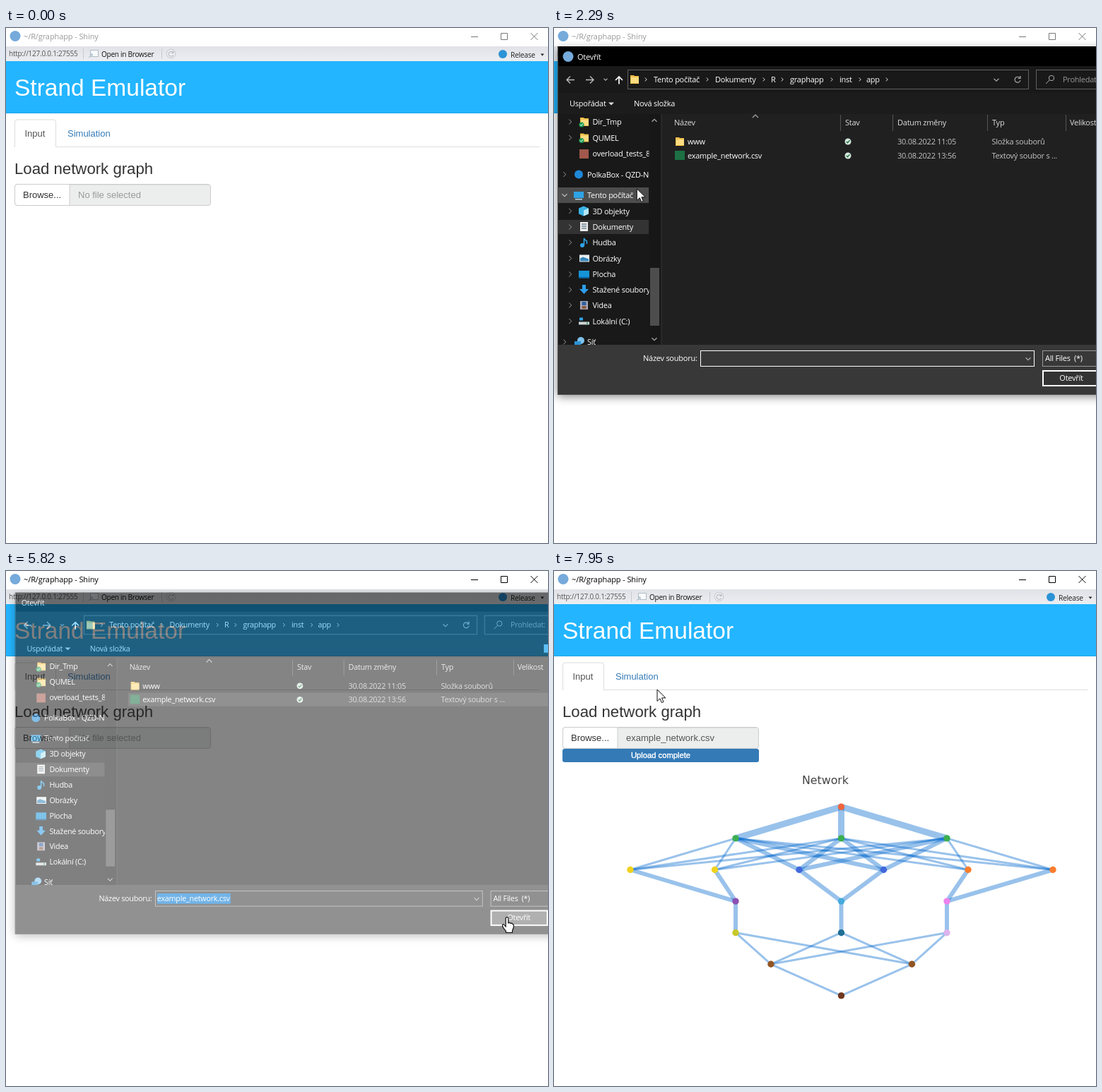
An HTML page for the animation above (8000 ms loop, 767 px wide and 730 px high).

```html
<!DOCTYPE html>
<html lang="en">
<head>
<meta charset="utf-8">
<title>Strand Emulator</title>
<style>
html,body{margin:0;width:100%;height:100%;overflow:hidden;background:#fff}
svg{display:block;width:767px;height:730px}
text{white-space:pre}
.ui{font:11px "Open Sans","Noto Sans",sans-serif;letter-spacing:-.25px}
.page{font:13px "Liberation Sans",Arial,sans-serif}
</style>
</head>
<body>
<svg id="stage" viewBox="0 0 767 730" xmlns="http://www.w3.org/2000/svg"></svg>
<script>
const LOOP = 8000;
const stage = document.getElementById('stage');

const rect = (x, y, w, h, fill, more = '') =>
  `<rect x="${x}" y="${y}" width="${w}" height="${h}" fill="${fill}" ${more}/>`;
const disc = (x, y, r, fill, more = '') =>
  `<circle cx="${x}" cy="${y}" r="${r}" fill="${fill}" ${more}/>`;
const line = (d, color, w = 1, more = '') =>
  `<path d="${d}" fill="none" stroke="${color}" stroke-width="${w}" ${more}/>`;
const shape = (d, fill, more = '') => `<path d="${d}" fill="${fill}" ${more}/>`;
const ui = (x, y, s, fill = '#fff', more = '') =>
  `<text class="ui" x="${x}" y="${y}" fill="${fill}" ${more}>${s}</text>`;
const page = (x, y, s, fill, size = 13, more = '') =>
  `<text class="page" x="${x}" y="${y}" fill="${fill}" style="font-size:${size}px" ${more}>${s}</text>`;
const group = (id, body, more = '') => `<g id="${id}" ${more}>${body}</g>`;

const right = (x, y, c = '#ddd', s = 2.5) => line(`M${x - s / 2} ${y - s}l${s} ${s}l${-s} ${s}`, c);
const down = (x, y, c = '#aaa', s = 3.5) => line(`M${x - s} ${y - s / 2}l${s} ${s}l${s} ${-s}`, c, 1.2);
const up = (x, y, c = '#aaa', s = 3.5) => line(`M${x - s} ${y + s / 2}l${s} ${-s}l${s} ${s}`, c, 1.2);
const folder = (x, y) => shape(`M${x} ${y - 6}h5l1 1h6v11h-12z`, '#f3c04b') +
  rect(x + 1, y - 3, 11, 8, '#ffdc80');

/* ---- application window ---- */
function windowBar() {
  return rect(0, 0, 767, 26, '#fff') + disc(13, 11.5, 7.5, '#75aadb') +
    ui(25, 16, '~/R/graphapp - Shiny', '#999', 'id="caption" style="letter-spacing:-.1px"') +
    group('controls', line('M658 12.5h10M700.5 7.5h9v9h-9zM742.5 7l10 10m0-10l-10 10', 'currentColor')) +
    rect(0, 26, 767, 21, 'url(#bar)') +
    ui(4, 40, 'http://127.0.0.1:27555', '#555', 'style="font-size:10px"') +
    line('M109.5 29v15M220.5 29v15', '#c8cacf') +
    rect(119.5, 31.5, 11, 9, '#f7f9fb', 'stroke="#b3bdc6"') +
    line('M117 42l5-5m-3 0h3v3', '#9fb3c0') +
    ui(135, 41, 'Open in Browser', '#111', 'style="font-size:10px"') +
    disc(233.5, 36.5, 6.3, '#eceef1', 'stroke="#c3c6cc"') +
    line('M236.5 35a3.4 3.4 0 1 0 .2 3.2M237 32.5v3h-3', '#b9bcc4', 1.2) +
    disc(703, 37, 6, '#2b93d6') +
    ui(714, 41.5, 'Release', '#222', 'style="font-size:10.2px"') +
    shape('M756.5 36.5h5l-2.5 3z', '#222');
}

function pageBody() {
  return rect(0, 47, 767, 74, '#23b5ff') + rect(0, 120, 767, 1, '#20a6ea') +
    page(12, 96, 'Strand Emulator', '#fff', 33.5) +
    line('M70.5 168.5H755M12 168.5h1', '#ddd') +
    line('M12.5 168.5V133.5q0-3.5 3.5-3.5H67q3.5 0 3.5 3.5V168.5', '#ddd') +
    page(26.5, 154, 'Input', '#555') + page(87, 154, 'Simulation', '#337ab7') +
    page(12, 207, 'Load network graph', '#333', 22.2) +
    rect(12.5, 221.5, 277, 30, '#eceeed', 'rx="3.5" stroke="#ccc"') +
    line('M91 222.5h197', '#dcdedd') +
    shape('M90 221.5H16q-3.5 0-3.5 3.5v23q0 3.5 3.5 3.5h74z', '#fff', 'id="browse" stroke="#ccc"') +
    page(24, 241, 'Browse...', '#333') +
    page(102, 241, 'No file selected', '#999', 13, 'id="fileName"') +
    group('upload', rect(12, 252, 278, 19, '#337ab7', 'rx="3" id="uploadBar"') +
      page(151, 265, 'Upload complete', '#fff', 11.2, 'text-anchor="middle" stroke="#fff" stroke-width=".4"'));
}

/* ---- network plot ---- */
const LAYERS = [
  ['406.5', '#f0643c'], ['257 406.5 556', '#3caf50 #3caf50 #3caf50'],
  ['108 227.5 347 466.5 586 706', '#f0d21e #f0d21e #4169dc #4169dc #fa7d2d #fa7d2d'],
  ['257 406.5 556', '#8c50b4 #46aadc #ee82ee'], ['257 406.5 556', '#c8c828 #1e6e96 #ddb4ee'],
  ['307 506.5', '#915523 #915523'], ['406.5', '#6e371e']
];
const layers = LAYERS.map(([xs, colors], i) => {
  const tint = colors.split(' ');
  return xs.split(' ').map((x, k) => ({x: +x, y: 334.3 + i * 44.6, c: tint[k]}));
});

function network() {
  const edge = (a, b, w) => line(`M${a.x} ${a.y}L${b.x} ${b.y}`, '#06c', w, 'opacity=".4"');
  const [top, hubs, mids, joins, ends, lows, last] = layers;
  let s = hubs.map(n => edge(top[0], n, 9)).join('');
  for (const h of hubs) mids.forEach((m, i) => s += edge(h, m, i === 2 || i === 3 ? 6 : 3));
  mids.forEach((m, i) => s += edge(m, joins[i >> 1], 6));
  joins.forEach((j, i) => s += edge(j, ends[i], 6));
  for (const e of ends) for (const l of lows) s += edge(e, l, 3);
  for (const l of lows) s += edge(l, last[0], 3);
  for (const n of layers.flat()) s += disc(n.x, n.y, 4.7, n.c);
  const tools = rect(617, 296, 12, 9, '#c7c7c7', 'rx="1"') + disc(623, 300.5, 2.5, '#fff') +
    rect(647, 295, 12, 11, '#c7c7c7') + line('M650 300.5h6m-3-3v6', '#fff', 1.5) +
    rect(669, 295, 12, 11, '#c7c7c7') + line('M672 300.5h6', '#fff', 1.5) +
    line('M693 296l10 9m0-9l-10 9', '#c7c7c7', 2) + rect(720, 293, 15, 15, '#8a93a6', 'rx="1"');
  return `<text x="384" y="301.5" text-anchor="middle" fill="#444" style="font:15.8px 'DejaVu Sans',sans-serif">Network</text>` +
    s + group('tools', tools);
}

/* ---- file dialog ---- */
const TREE = [
  ['Dir_Tmp', 133], ['QUMEL', 155.5], ['overload_tests_8', 178], ['PolkaBox - QZD-NO', 207.5],
  ['Tento počítač', 237], ['3D objekty', 259.5], ['Dokumenty', 282], ['Hudba', 304],
  ['Obrázky', 326.5], ['Plocha', 349], ['Stažené soubory', 371], ['Videa', 393],
  ['Lokální (C:)', 415.5], ['Síť', 445]
];
const isRoot = i => i === 3 || i === 4 || i === 13;

function treeIcon(i, y) {
  const screen = (x, w) => rect(x, y - 5, w, 9, '#2ea3e6');
  switch (i) {
    case 0: case 1: return folder(37, y) + disc(39, y + 4, 3.6, '#1f9d55') + line(`M37 ${y + 4}l1.5 1.5 2.5-3`, '#fff');
    case 2: return rect(36, y - 6, 13, 13, '#a2584c');
    case 3: return disc(35, y, 6, '#1f88d8');
    case 4: return screen(28, 14) + rect(30, y + 5, 10, 1.5, '#b9d7ea');
    case 5: return shape(`M42 ${y - 7}l7 3v8l-7 3-7-3v-8z`, '#39b2e5') + shape(`M42 ${y - 1}l7-3v8l-7 3z`, '#b5e6f7');
    case 6: return rect(37, y - 7, 11, 13, '#eee') + line(`M39 ${y - 4}h7m-7 3h7m-7 3h7`, '#68808f', 1.3);
    case 7: return disc(40, y + 4, 3, '#2ea3e6') + line(`M42.5 ${y + 4}v-10q1 3 4 4v4`, '#2ea3e6', 1.6);
    case 8: return rect(36, y - 5, 14, 10, '#e8eef2') + shape(`M37 ${y + 4}v-4l4-2 8 3v3z`, '#3888bd');
    case 9: return rect(35, y - 5, 15, 11, '#1593d8') + rect(35, y + 4, 15, 2, '#0a5f9a');
    case 10: return shape(`M40 ${y - 7}h5v6h4l-6.5 7-6.5-7h4z`, '#2d9eea');
    case 11: return rect(37, y - 6, 11, 12, '#aab') + rect(39.5, y - 5, 6, 5, '#315f9c') + rect(39.5, y + 1, 6, 4, '#8a5b3e');
    case 12: return rect(35, y + 1, 15, 4, '#cfd6da') + rect(36, y - 5, 5, 4, '#2ea3e6') + rect(46, y + 2, 2, 2, '#2a9d5b');
    default: return disc(38, y - 2, 5, '#7ec3ec') + rect(29, y - 1, 9, 6, '#2b93d6');
  }
}

function tree() {
  let s = rect(6, 272, 128, 20, '#333') + rect(6, 226, 128, 22, '#4d4d4d', 'id="treeHover"');
  let chevrons = '';
  TREE.forEach(([name, y], i) => {
    s += treeIcon(i, y) + ui(isRoot(i) ? 47 : 54.5, y + 4, name);
    if (i === 4) chevrons += down(15, y, '#bbb');
    else if (i !== 2) chevrons += right(isRoot(i) ? 15 : 23, y, '#999', 3.5);
  });
  return `<g clip-path="url(#treeClip)">${s}${group('chevrons', chevrons)}</g>`;
}

function files() {
  const sync = y => disc(416, y, 4.5, '#d5e8dc') + line(`M413.8 ${y}l1.7 1.8 3-3.6`, '#17633a', 1.3);
  let s = line('M405.5 123v23M479.5 123v23M613.5 123v23M724.5 123v23', '#555') + up(285, 125, '#aaa', 4);
  [[170, 'Název'], [412, 'Stav'], [486, 'Datum změny'], [620, 'Typ'], [730, 'Velikost']]
    .forEach(([x, label]) => s += ui(x, 138, label, '#dedede'));
  s += rect(168, 171, 640, 19.5, '#4d4d4d', 'id="fileRow"') + folder(172, 161) + rect(171, 174, 14, 13, '#1d7044');
  [['www', '30.08.2022 11:05', 'Složka souborů', 161], ['example_network.csv', '30.08.2022 13:56', 'Textový soubor s ...', 181]]
    .forEach(([name, date, type, y]) =>
      s += ui(189, y + 4, name) + sync(y) + ui(486, y + 4, date, '#c4c4c4') + ui(619.5, y + 4, type, '#c4c4c4'));
  return s;
}

function addressBar() {
  let s = line('M29 73.5H18m5-5l-5 5 5 5M45 73.5h11m-5-5l5 5-5 5', '#bbb', 1.4) + down(73, 73, '#aaa', 2.5) +
    line('M92 79.5V69m-5 5l5-5 5 5', '#fff', 1.7) +
    rect(104.5, 59.5, 567, 27, '#191919', 'stroke="#606060"') + folder(108, 73) +
    rect(682.5, 59.5, 200, 27, '#191919', 'stroke="#606060"');
  [[141, 'Tento počítač'], [228, 'Dokumenty'], [307, 'R'], [334, 'graphapp'], [404, 'inst'], [442, 'app']]
    .forEach(([x, label]) => s += ui(x, 77, label));
  [130, 217, 297, 323, 393, 433, 471].forEach(x => s += right(x, 73));
  return s + down(626, 73.5) + line('M659 70.5a4 4 0 1 0 1 3.5M660 68v3.5h-3.5', '#aaa', 1.2) +
    disc(704, 71, 3.7, 'none', 'stroke="#aaa"') + line('M701 74l-5 5', '#aaa') + ui(720, 77, 'Prohledat:', '#999') +
    ui(22, 111, 'Uspořádat') + shape('M77 105.5h8l-4 4z', '#ddd') + ui(113, 111, 'Nová složka') +
    rect(768, 101, 12, 12, '#8cc8f0');
}

function dialog() {
  const W = 812;
  const skeleton = rect(5, 54, W, 395, '#fff') + rect(5, 122, 147, 327, '#191919') +
    rect(136, 340, 13, 82, '#4d4d4d') + up(142, 131) + down(142, 441) +
    rect(126, 461, 77, 15, '#fff') + rect(207, 457, 473, 23, '#fff') +
    rect(691, 457, 110, 23, '#fff') + rect(691, 485, 83, 24, '#fff');
  const content = rect(5, 54, W, 68, '#191919') + rect(5, 92, W, 30, '#1c1c1c') +
    rect(5, 122, 147, 327, '#191919') + rect(152, 122, 665, 327, '#202020') + rect(151.5, 122, 1, 327, '#343434') +
    addressBar() + tree() + rect(135, 122, 15, 327, '#171717') + rect(136, 340, 13, 82, '#4d4d4d') +
    up(142, 131) + down(142, 441) + files() + rect(5, 449, W, 71, '#383838') +
    ui(126, 472, 'Název souboru:') +
    rect(207.5, 457.5, 472, 22, '#383838', 'id="field" stroke="#fff"') +
    rect(210, 461, 106, 15, '#0078d7', 'id="marked"') + ui(210, 472.5, 'example_network.csv', '#fff', 'id="chosen"') +
    rect(210, 462, 1, 14, '#fff', 'id="caret"') + down(671, 469) +
    rect(691.5, 457.5, 110, 22, '#383838', 'stroke="#9a9a9a"') + ui(695, 472, 'All Files  (*)') +
    rect(692, 486, 81, 21, '#333', 'id="openButton" stroke="#fff" stroke-width="2"') +
    ui(732, 500, 'Otevřít', '#fff', 'text-anchor="middle"');
  return rect(5, 31, W, 491, '#000', 'filter="url(#soft)" opacity=".5"') +
    group('panel', rect(5, 26, W, 28, '#000') + rect(5, 449, W, 71, '#383838') +
      group('skeleton', skeleton) + group('content', content) +
      disc(20, 40.5, 7.5, '#75aadb', 'id="dialogIcon"') + ui(33, 45, 'Otevřít', '#fff', 'id="dialogTitle"') +
      line('M5.5 27v492.5H817', '#4a4a4a'));
}

const handShape = 'M-1.8 13V1.5a1.8 1.8 0 0 1 3.6 0V8l1.4-.5 2 .9 1.2-.2 1.6 1.2c1 .2 1.5 1.3 1.5 2.8 0 4-2 5-2 7.5V21.5h-9v-1.8C-3.5 17-6.5 13.5-6.5 11.5c0-2 2-2 3-.3z';
stage.innerHTML = `<defs>
  <linearGradient id="bar" x2="0" y2="1"><stop stop-color="#e0e2e7"/><stop offset="1" stop-color="#eceef1"/></linearGradient>
  <filter id="soft" x="-5%" y="-10%" width="110%" height="120%"><feGaussianBlur stdDeviation="7"/></filter>
  <clipPath id="treeClip"><rect x="6" y="122" width="128.5" height="327"/></clipPath></defs>` +
  rect(0, 0, 767, 730, '#fff') + windowBar() + pageBody() + group('plot', network()) + group('dialog', dialog()) +
  group('cursor',
    shape('M0 0V16.5l4-3.7 2.4 5.8 2.6-1.1-2.4-5.6H12z', '#fff', 'id="arrow" stroke="#111"') +
    shape(handShape, '#fff', 'id="hand" stroke="#111" stroke-width="1.2"') +
    line('M-10.5 0h21M0-10.5v21', '#322c2a', 2, 'id="cross"'));

const parts = {};
stage.querySelectorAll('[id]').forEach(e => parts[e.id] = e);

/* ---- motion ---- */
// time, x, y
const PATH = [
  [80, 678, 742], [500, 410, 530], [900, 178, 343], [1250, 57, 244], [2120, 57, 244], [2290, 117, 228],
  [2720, 250, 183], [3350, 285, 181], [4110, 415, 289], [4820, 618, 427], [4890, 637, 440], [5260, 709, 491],
  [5920, 709, 491], [6700, 488, 400], [7300, 486, 399], [7930, 146, 168], [8000, 146, 168]
];
const clamp = v => Math.max(0, Math.min(1, v));
const ramp = (t, a, b) => clamp((t - a) / (b - a));

function pointer(t) {
  const i = PATH.findIndex(p => p[0] > t);
  if (i < 1) return PATH[i < 0 ? PATH.length - 1 : 0].slice(1);
  const [t0, x0, y0] = PATH[i - 1], [t1, x1, y1] = PATH[i];
  const k = (t - t0) / (t1 - t0);
  return [x0 + (x1 - x0) * k, y0 + (y1 - y0) * k];
}

const show = (id, on) => parts[id].setAttribute('display', on ? 'inline' : 'none');
const set = (id, name, value) => parts[id].setAttribute(name, value);

function draw(t) {
  const [x, y] = pointer(t);
  const inside = (l, top, r, b) => x >= l && x <= r && y >= top && y <= b;
  const open = ramp(t, 1670, 1930), close = ramp(t, 5740, 5920);
  const dialogOn = open > 0 && close < 1;

  const active = (t > 1480 && t < 1660) || t >= 5780;
  set('caption', 'fill', active ? '#000' : '#999');
  set('controls', 'color', active ? '#000' : '#777');

  const overBrowse = inside(12, 221, 90, 252);
  const pressed = t > 1450 && t < 2000;
  const hovered = overBrowse && !dialogOn;
  set('browse', 'fill', pressed ? '#d4d4d4' : hovered ? '#e6e6e6' : '#fff');
  set('browse', 'stroke', pressed ? '#8c8c8c' : hovered ? '#adadad' : '#ccc');

  const loaded = t >= 6200;
  parts.fileName.textContent = loaded ? 'example_network.csv' : 'No file selected';
  set('fileName', 'fill', loaded ? '#555' : '#999');
  show('upload', loaded);
  set('uploadBar', 'width', 278 * ramp(t, 6130, 6430));
  show('plot', t >= 6630);
  set('tools', 'opacity', ramp(t, 6710, 7010) * (1 - ramp(t, 7640, 7940)));

  show('dialog', dialogOn);
  set('dialog', 'opacity', open * (1 - close));
  const scale = (0.947 + 0.053 * open) * (1 - 0.043 * close);
  set('dialog', 'transform', `translate(411 255) scale(${scale}) translate(-411 -255)`);
  show('skeleton', t < 1760);
  show('content', t >= 1760);
  show('dialogIcon', close === 0);
  set('dialogTitle', 'x', close > 0 ? 14 : 33);
  show('treeHover', t > 2150 && inside(6, 226, 134, 248));
  set('chevrons', 'opacity', ramp(t, 2150, 2260) * (1 - ramp(t, 2900, 3400)));

  const selected = t >= 3030, named = t >= 3290, confirmed = t >= 5600;
  show('fileRow', selected || inside(168, 171, 767, 190));
  set('fileRow', 'fill', confirmed ? '#383838' : selected ? '#777' : '#4d4d4d');
  show('chosen', named);
  set('field', 'stroke', named ? '#9a9a9a' : '#fff');
  show('caret', !named && t > 1970 && Math.floor((t - 1970) / 530) % 2 === 1);
  show('marked', confirmed);
  const overOpen = inside(691, 485, 774, 508);
  set('openButton', 'fill', overOpen ? '#707070' : '#333');

  const useHand = (overBrowse && t < 2120) || (overOpen && t > 5000 && t <= 5930);
  const useCross = t >= 6630 && y > 320;
  set('cursor', 'transform', `translate(${x} ${y})`);
  show('cursor', t >= 130);
  show('hand', useHand);
  show('cross', useCross);
  show('arrow', !useHand && !useCross);
}

const start = performance.now();
function tick() {
  draw((performance.now() - start) % LOOP);
  requestAnimationFrame(tick);
}
tick();
</script>
</body>
</html>
```
